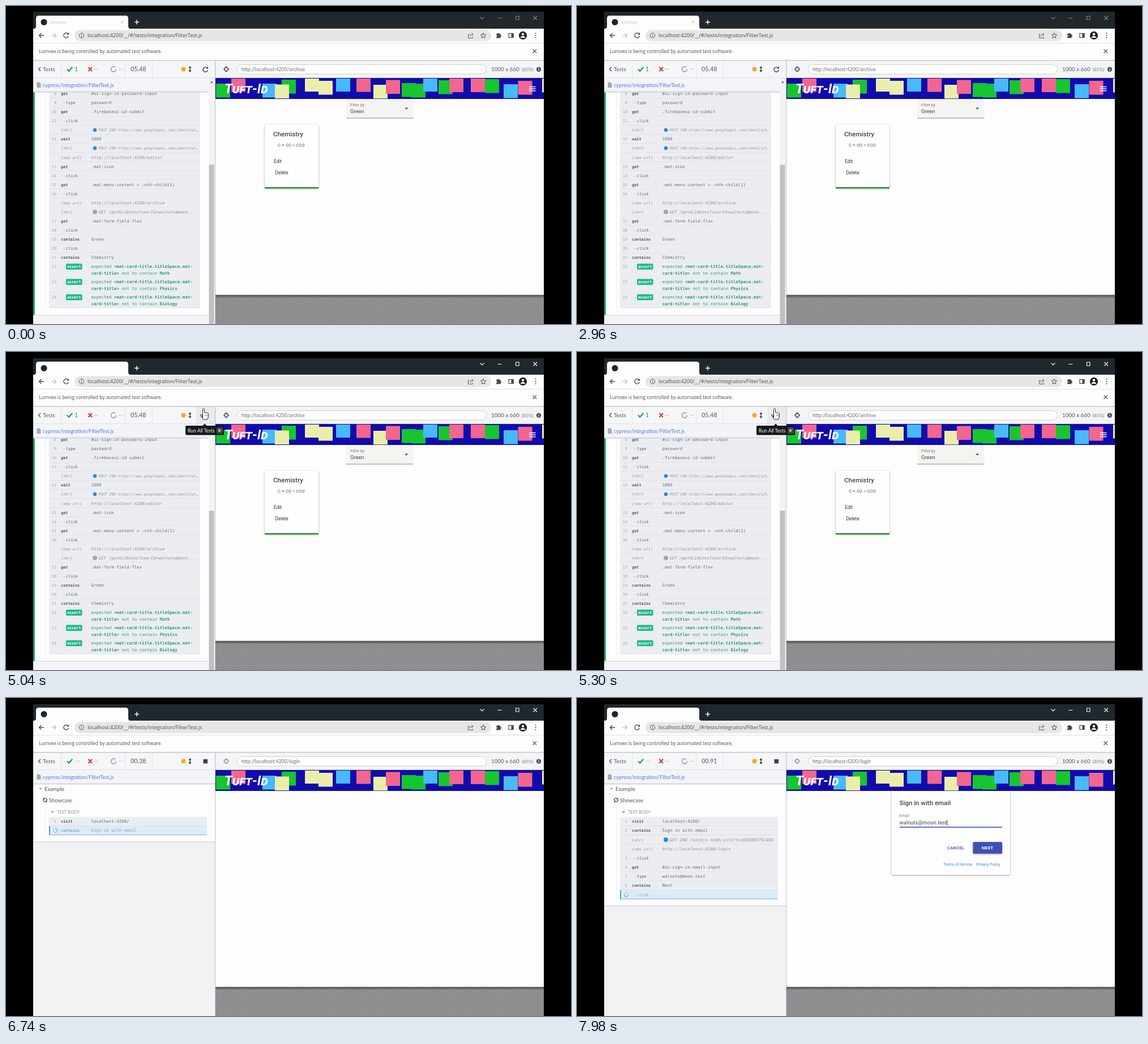
An HTML page that plays this animation: 998 px wide and 561 px high, repeating every 8000 ms.

```html
<!DOCTYPE html>
<html lang="en">
<head>
<meta charset="utf-8">
<title>Test run</title>
<style>
  html, body { margin: 0; width: 100%; height: 100%; overflow: hidden; background: #000; }
  svg { display: block; width: 100%; height: 100%; }
  text { white-space: pre; }
  .ui { font-family: "Open Sans", sans-serif; }
  .lato { font-family: Lato, sans-serif; }
  .mono { font-family: "DejaVu Sans Mono", monospace; }
  .rob { font-family: Roboto, sans-serif; }
  .b { font-weight: 700; }
  .m { font-weight: 500; }
  .i { font-style: italic; }
  .shadow { filter: drop-shadow(0 1px 1.5px rgba(0,0,0,.38)); }
</style>
</head>
<body>
<svg id="stage" viewBox="0 0 998 561" preserveAspectRatio="none"></svg>
<script>
const LOOP = 8000;
const EMAIL = 'walnuts@moon.test';
const esc = s => s.replace(/&/g, '&amp;').replace(/</g, '&lt;');
const text = (x, y, s, size, fill, cls = 'lato', extra = '') =>
  `<text x="${x}" y="${y}" font-size="${size}" fill="${fill}" class="${cls}" ${extra}>${esc(s)}</text>`;
const rect = (x, y, w, h, fill, extra = '') =>
  `<rect x="${x}" y="${y}" width="${w}" height="${h}" fill="${fill}" ${extra}/>`;
const line = (d, color, w = 1, extra = '') =>
  `<path d="${d}" fill="none" stroke="${color}" stroke-width="${w}" ${extra}/>`;
const shape = (d, fill, extra = '') => `<path d="${d}" fill="${fill}" ${extra}/>`;
const dot = (x, y, r, fill, extra = '') => `<circle cx="${x}" cy="${y}" r="${r}" fill="${fill}" ${extra}/>`;
const group = (id, body, extra = '') => `<g id="${id}" ${extra}>${body}</g>`;

// ---- browser window ----
const controls = color =>
  line('M837.5 19.5l3.5 3.5 3.5-3.5M868.5 21.5h7M900.5 18h5.5v6h-5.5zM931.5 18l6.5 6.5M938 18l-6.5 6.5', color, 1.1);

function browser() {
  return rect(48, 11, 902, 550, '#fdfdfd') + rect(48, 11, 902, 29, '#21282d') +
    shape('M49 40Q53 40 53 36V22Q53 17 58 17H211Q216 17 216 22V36Q216 40 220 40Z', '#fdfdfd') +
    dot(67, 28.5, 5.5, '#20242a') +
    line('M227 28.5h8M231 24.5v8', '#fff', 1.4) +
    rect(121, 42.5, 736, 19.5, '#e6e7e5', 'rx="9.75"') +
    line('M67 52h-8.5M62.5 48l-4 4 4 4', '#45494d', 1.3) +
    line('M80 52h8.5M84.5 48l4 4-4 4', '#b9bbbd', 1.2) +
    line('M109.8 49.5A4.3 4.3 0 1 0 110.3 53', '#45494d', 1.3) + shape('M107 50.5h4v-4z', '#45494d') +
    dot(133.5, 52, 4.2, 'none', 'stroke="#55595d"') + line('M133.5 51.5v3M133.5 49.5v1', '#55595d', 1.1) +
    text(144, 55.3, 'localhost:4200/__/#/tests/integration/FilterTest.js', 8.95, '#44484c', 'ui') +
    line('M819 50h-2.5v6.5h8v-2M819.5 54q0-4 5-4M822.5 47.5l2.5 2.5-2.5 2.5', '#55595d', 1) +
    line('M843 47.5l1.4 3 3.2.4-2.4 2.2.6 3.2-2.8-1.6-2.8 1.6.6-3.2-2.4-2.2 3.2-.4z', '#45494d', 1) +
    shape('M866 49h2.2a1.5 1.5 0 0 1 3 0h2.3v2.3a1.5 1.5 0 0 1 0 3v2.3h-7.5v-2.3a1.5 1.5 0 0 0 0-3z', '#45494d') +
    rect(888, 48.5, 8, 7, 'none', 'stroke="#45494d" stroke-width="1.2"') + rect(892.5, 48, 4, 8, '#45494d') +
    dot(913, 52, 7.2, '#1f2327') + dot(913, 49.8, 2.2, '#fff') + shape('M908.5 56q1-3 4.5-3t4.5 3z', '#fff') +
    [48, 52, 56].map(y => dot(935.5, y, 1, '#45494d')).join('') +
    rect(48, 65, 902, 1, '#dedfe0') +
    text(58, 83, 'Lumvex is being controlled by automated test software.', 8.45, '#4a4e52', 'ui') +
    line('M930.5 76.5l6.5 6.5M937 76.5l-6.5 6.5', '#55595d', 1.2) +
    rect(48, 95, 902, 2.5, '#d2d3d5');
}

// ---- runner header ----
function header() {
  const seps = [97, 210, 258].map(x => rect(x, 97, 1, 30, '#e3e4ea')).join('');
  return rect(48, 97, 321, 30, '#f5f6f7') + seps +
    line('M61 108l-3.5 3.5 3.5 3.5', '#4a4e56', 1.4) + text(65, 115, 'Tests', 9.8, '#55595f') +
    line('M108 111.5l3.2 3.3 6-7', '#21a06e', 2.3) +
    line('M145.5 108l6.5 7M152 108l-6.5 7', '#dd3a3d', 2.2) + text(155, 115, '--', 10.5, '#e08a8a') +
    dot(190, 111.5, 4.5, 'none', 'stroke="#8f92a5" stroke-width="1.4" stroke-dasharray="24 4.3"') +
    text(199, 115, '--', 10.5, '#a9abbd') +
    dot(313.5, 111.5, 4, '#f9a825') +
    line('M325 108v7', '#333a42', 1.3) + shape('M322.3 109.5l2.7-3.5 2.7 3.5zM322.3 113.5l2.7 3.5 2.7-3.5z', '#333a42') +
    rect(370, 97, 580, 30, '#f3f4f5') +
    rect(408.5, 103.5, 440, 16.5, '#fefefe', 'rx="8" stroke="#cfd0d2"') +
    text(857, 115, '1000 x 660', 9.8, '#55595f') + text(911, 115, '(85%)', 8.2, '#777b80') +
    dot(941, 111.8, 4.2, '#4a4e55') + rect(940.5, 110.8, 1.2, 3.5, '#fff') + rect(940.5, 108.8, 1.2, 1.2, '#fff');
}
const aim = color => dot(389, 111.5, 3.5, 'none', `stroke="${color}" stroke-width="1.3"`) +
  line('M389 106.5v3.5M389 113v3.5M384 111.5h3.5M390.5 111.5h3.5', color, 1.2);

// ---- command log ----
const SIZE = 7.45, ROW = '#ebedf1', RULE = '#d9dce3';
function row(y, [num, name, msg, size = SIZE, color = '#2f86d1'], right, running) {
  const event = !num, child = name[0] === '-';
  const ink = running ? '#86a4b8' : event ? '#8f939a' : '#545a61';
  const cls = event ? 'mono i' : 'mono';
  let out = rect(76, y - 8, right - 76, 16.1, running ? '#dcebf8' : ROW) +
    rect(76, y + 7.4, right - 76, .8, running ? '#5fa5dd' : RULE);
  if (running) out += rect(76, y - 8, 1.6, 16, '#3f87c4') + spinner(87, y);
  else out += text(89, y + 2.6, num, 6.9, '#a3a7af', 'mono', 'text-anchor="end"');
  out += child ? text(100.5, y + 2.6, '-', 6.9, ink, 'mono') + text(106, y + 2.6, name.slice(1), 6.9, ink, 'mono m')
    : text(97, y + 2.6, name, 6.9, ink, event ? cls : 'mono b');
  const xhr = name === '(xhr)';
  if (xhr) out += dot(157, y, size < 7 ? 3.3 : 4, color);
  return out + text(xhr ? 163.5 : 150.5, y + 2.6, msg, size, running || event ? ink : '#696e75', cls);
}
const spinner = (x, y) => dot(x, y, 3.5, 'none',
  `class="spin" data-c="${x} ${y}" stroke="#7ba6c8" stroke-width="1.3" stroke-dasharray="12 2 1.5 2 1.5 3"`);

const post = ['', '(xhr)', 'POST 200 https://www.googleapis.com/identityt…', 6.35];
const DONE = [
  ['8', 'get', '#ui-sign-in-password-input'], ['9', '-type', 'password'],
  ['10', 'get', '.firebaseui-id-submit'], ['11', '-click', ''], post,
  ['12', 'wait', '1000'], post, ['', '(new url)', 'http://localhost:4200/editor'],
  ['13', 'get', '.mat-icon'], ['14', '-click', ''],
  ['15', 'get', '.mat-menu-content > :nth-child(1)'], ['16', '-click', ''],
  ['', '(new url)', 'http://localhost:4200/archive'],
  ['', '(xhr)', 'GET /getALLNotes?userId=walnuts@moon...', 7.3, '#a3a5a8'],
  ['17', 'get', '.mat-form-field-flex'], ['18', '-click', ''],
  ['19', 'contains', 'Green'], ['20', '-click', ''], ['21', 'contains', 'Chemistry']
];
function assertion(subject, k) {
  const y = 459.5 + 27 * k, green = '#2f9a74';
  return rect(76, y - 8, 267, 27, ROW) + rect(76, y + 18.3, 267, .8, RULE) +
    text(89, y + 2.6, String(22 + k), 6.9, '#a3a7af', 'mono', 'text-anchor="end"') +
    text(100.5, y + 2.6, '-', 6.9, '#545a61', 'mono') +
    rect(106, y - 5, 28.5, 10.5, '#1fb986', 'rx="1.5"') + text(108, y + 2.3, 'assert', 6.7, '#fff', 'mono b') +
    `<text class="mono" font-size="${SIZE}" fill="${green}"><tspan x="150.5" y="${y + 2.6}">expected </tspan>` +
    `<tspan class="b">&lt;mat-card-title.titleSpace.mat-</tspan><tspan class="b" x="150.5" y="${y + 14.6}">card-title&gt;</tspan>` +
    `<tspan> not to contain </tspan><tspan class="b">${subject}</tspan></text>`;
}
const fileBar = () => rect(48, 127, 321, 24.5, '#f3f4f8') + rect(48, 150.5, 321, 2, '#d3d5e0') +
  shape('M54.5 134.5h4.5l2.5 2.5v7h-7z', '#a5a8ae') +
  text(65, 142.5, 'cypress/integration/FilterTest.js', 9.04, '#5577dc');

function doneLog() {
  return rect(48, 127, 310, 418, '#fdfdfd') + rect(48, 545, 310, 1.2, '#cfd0e2') + rect(48, 546, 310, 15, '#f4f4f6') +
    rect(48, 152, 3, 393, '#1fa971') + line('M69.5 152v381', '#dcdfe3', 1, 'stroke-dasharray="1 1"') +
    DONE.map((r, i) => row(154.5 + 16.06 * i, r, 343)).join('') +
    ['Math', 'Physics', 'Biology'].map(assertion).join('') + fileBar() +
    rect(358, 127, 11, 434, '#f3f3f3') + rect(358.5, 280, 9, 281, '#c1c1c3') +
    shape('M361 135.5l2.3-3 2.3 3z', '#444');
}

// [start time, row]
const RUN = [
  [6180, ['1', 'visit', 'localhost:4200/']],
  [6680, ['2', 'contains', 'Sign in with email']],
  [6800, ['', '(xhr)', 'GET 200 /sockjs-node/info?t=1650405791403']],
  [6860, ['', '(new url)', 'http://localhost:4200/login']],
  [6900, ['3', '-click', '']],
  [7000, ['4', 'get', '#ui-sign-in-email-input']],
  [7060, ['5', '-type', EMAIL]],
  [7700, ['6', 'contains', 'Next']],
  [7800, ['7', '-click', '']]
];
function runLog(count) {
  const bottom = 221 + 16.15 * count;
  const rows = RUN.slice(0, count).map(([, r], i) =>
    row(217.7 + 16.15 * i, r, 355, i === count - 1 && r[0] !== '')).join('');
  return rect(48, 152, 321, bottom - 152, '#fdfdfd') + rect(48, bottom, 321, 1.2, '#cfd0e2') +
    shape('M58.5 158.8h5l-2.5 3z', '#8a8e94') + text(68, 163.5, 'Example', 9.4, '#50545a') +
    `<g class="spin" data-c="69 180">${line('M65.7 180.5a3.3 3.3 0 0 1 5.8-2.6M72.3 179.5a3.3 3.3 0 0 1-5.8 2.6', '#4c5158', 1.3)}` +
    `${shape('M72.7 176v3.3h-3.3zM65.3 184v-3.3h3.3z', '#4c5158')}</g>` +
    text(76, 183.5, 'Showcase', 9.4, '#50545a') +
    line(`M69.5 193V${bottom - 11}`, '#dcdfe3', 1, 'stroke-dasharray="1 1"') +
    (count ? shape('M79.5 199.7h5.5l-2.75 3.2z', '#8a8e94') + text(90, 204, 'TEST BODY', 7.5, '#888c93') : '') + rows;
}

// ---- page under test ----
const PINK = '#f26690', GREEN = '#17c52f', BLUE = '#48b9fa', CREAM = '#ebeeab';
const NOTES = [
  [398, 127, PINK], [371, 137, GREEN], [453, 137, BLUE], [487, 130, GREEN], [475, 138.5, CREAM],
  [528, 126.5, CREAM], [552, 132, CREAM], [583, 126.5, BLUE], [619, 127, PINK], [649, 139, CREAM],
  [671, 130.5, PINK], [699, 136, GREEN], [716, 137, GREEN], [737, 126.5, BLUE], [764, 131, GREEN],
  [783, 127.5, PINK], [821, 127.5, PINK], [846, 129, GREEN], [879, 138, BLUE], [904.5, 132, PINK], [947, 128, CREAM]
];
const banner = () => rect(370, 127, 580, 37, '#120bac') +
  `<g clip-path="url(#bar)">${NOTES.map(([x, y, c]) => rect(x, y, 25, 24.5, c)).join('')}</g>` +
  text(386, 154, 'Tuft-Id', 23, '#fff', 'rob b i', 'style="font-variant:small-caps"');

const archive = () =>
  [141.8, 145.3, 148.8].map(y => rect(924, y, 11.5, 1.5, '#fff')).join('') +
  rect(601, 164, 118.5, 34, '#f4f4f1') + rect(601, 197.3, 118.5, 1, '#8b8b8b') +
  text(608, 177, 'Filter by', 7.1, '#777', 'rob') + text(608, 188.5, 'Green', 9.4, '#444', 'rob') +
  shape('M704 179.5h6.5l-3.25 3.3z', '#555') +
  rect(457, 209.5, 95, 112, '#fefefe', 'rx="2" class="shadow"') + rect(457, 319.5, 95, 2.3, '#25892b') +
  text(472, 230, 'Chemistry', 11.6, '#444', 'rob m') + text(480, 247.5, 'C + O2 = CO2', 8.1, '#555', 'rob') +
  text(473, 276.5, 'Edit', 8.3, '#333', 'rob') + text(475.5, 297, 'Delete', 8.2, '#333', 'rob');

const login = () =>
  rect(555.5, 164, 209.5, 148, '#fefefe', 'class="shadow"') +
  banner() +
  text(569.5, 188.5, 'Sign in with email', 11.5, '#444', 'rob m') +
  text(569.8, 210, 'Email', 6.9, '#777', 'rob') + rect(570, 227.5, 181, .6, '#bbb') +
  rect(570, 227, 181, 1.6, '#3f51b5', 'id="focus"') +
  '<text id="typed" x="569.5" y="223.3" font-size="9.4" fill="#444" class="rob"></text>' +
  rect(0, 215, .9, 10, '#222', 'id="caret"') +
  text(654, 266.5, 'CANCEL', 8, '#3f51b5', 'rob m') +
  rect(699.5, 254, 51.5, 20.5, '#3f51b5', 'rx="1.5" class="shadow"') + text(715, 266.7, 'NEXT', 8, '#fff', 'rob b') +
  text(647, 296, 'Terms of Service', 6.9, '#4a7fd6', 'rob') + text(705, 296, 'Privacy Policy', 6.9, '#4a7fd6', 'rob');

const hand = shape('M-1.5 8V-6.5q0-1.5 1.5-1.5t1.5 1.5v5l5 1q2 .5 2 2.5v3q0 3-2 6h-7q-2-3-5-7 0-2 2-1.5z',
  '#fff', 'stroke="#222" transform="translate(-1 0)"') + line('M3 2v3M5.5 2.5v3', '#222', .7);
const arrow = shape('M0-8v14l3.3-3 2.2 5 2-1-2.2-4.8h4.5z', '#fff', 'stroke="#222" stroke-width=".9"');

document.getElementById('stage').innerHTML =
  `<defs><clipPath id="bar">${rect(370, 128, 580, 35.5)}</clipPath>` +
  `<pattern id="hatch" width="4" height="4" patternUnits="userSpaceOnUse">${rect(0, 0, 4, 4, '#a2a2a3')}` +
  `${line('M-1 1l2-2M-1 5l6-6M3 5l2-2', '#79797c', 1.3)}</pattern>` +
  '<linearGradient id="fall" x2="0" y2="1"><stop stop-opacity=".5"/><stop offset="1" stop-opacity="0"/></linearGradient></defs>' +
  rect(0, 0, 998, 561, '#000') + browser() +
  group('idle', rect(48, 10, 902, 1.5, '#21282d') + controls('#85898c') + text(78, 31.3, 'webapp', 7.5, '#c4c5bb', 'ui') +
    line('M203 26l4.5 4.5M207.5 26l-4.5 4.5', '#b4b5b0', 1)) +
  group('focused', controls('#fff')) + header() +
  group('passed', text(121, 115, '1', 10.5, '#2c9a70') + aim('#3f444a')) +
  group('running', text(122, 115, '--', 10.5, '#8cb9a5') + aim('#93979c') + rect(348.5, 108, 7.5, 7.5, '#3d4249')) +
  group('hover', rect(336, 97, 33, 30, '#e9eaee')) +
  group('reload', line('M355.5 109.5A4.2 4.2 0 1 0 356.3 113', '#3d4249', 1.4) + shape('M353 110.5h4v-4z', '#3d4249')) +
  '<text id="clock" class="lato" x="220" y="115.3" font-size="10.8" fill="#55595f"></text>' +
  '<text id="address" class="lato" x="416" y="114.6" font-size="8.76" fill="#696d72"></text>' +
  group('loading', shape('M797 103.5h48q8 0 8 8.25t-8 8.25h-48z', '#e9eaec', 'stroke="#cfd0d2"') +
    text(800.5, 115, '...loading', 8.4, '#666a70') +
    dot(842, 111.5, 4, 'none', 'class="spin" data-c="842 111.5" stroke="#6d7177" stroke-width="2" stroke-dasharray="1.6 1.54"')) +
  rect(48, 126.5, 902, 1, '#d0d2dc') + rect(48, 127, 321, 434, '#f2f2f4') +
  group('doneLog', doneLog()) + group('runLog', '') + group('runBar', fileBar()) +
  rect(369, 97, 1.3, 464, '#c3c4d8') +
  rect(370.3, 127, 579.7, 383, '#fdfdfd') + group('banner', banner()) + group('archive', archive()) + group('login', login()) +
  rect(370, 510, 580, 51, 'url(#hatch)') + rect(370, 509.5, 580, 6, 'url(#fall)') +
  group('tip', rect(317, 130, 68, 16.5, '#17181a', 'rx="2"') + shape('M347 130.5l4-4 4 4z', '#17181a') +
    text(321, 141.5, 'Run All Tests', 8.6, '#fff') + rect(372, 133, 11, 11, '#43464b', 'rx="1.5"') +
    text(375.3, 141, 'R', 6.5, '#fff', 'mono b')) +
  group('cursor', group('arrow', arrow) + group('hand', hand));

// ---- timeline ----
const FOCUS = 3700, HOVER = 4780, RERUN = 5400, GONE = 5700, LOADED = 6660, FORM = 6940;
const CLOCK = [[6100, 0], [6440, .20], [7260, .70], [7980, .91], [8000, .92]];
const POINTER = [[4300, 410, 210], [HOVER, 350, 108], [RERUN, 350, 108], [GONE, 620, -14]];

const $ = id => document.getElementById(id);
const clamp = v => Math.min(1, Math.max(0, v));
const show = (id, on) => { $(id).style.display = on ? '' : 'none'; };
function sample(keys, t, col = 1) {
  if (t <= keys[0][0]) return keys[0][col];
  for (let i = 1; i < keys.length; i++) {
    const a = keys[i - 1], b = keys[i];
    if (t <= b[0]) return a[col] + (b[col] - a[col]) * (t - a[0]) / (b[0] - a[0]);
  }
  return keys[keys.length - 1][col];
}

let shownRows = -1;
function render(t) {
  const rerun = t >= RERUN, loaded = t >= LOADED, form = t >= FORM;
  const hovering = t >= HOVER && !rerun;
  show('idle', t < FOCUS);
  show('focused', t >= FOCUS);
  show('passed', !rerun);
  show('running', rerun);
  show('hover', hovering);
  show('reload', !rerun && !hovering);
  show('doneLog', !rerun);
  show('runLog', t >= 6100);
  show('runBar', rerun);
  show('loading', t >= 6180 && !loaded);
  show('banner', !rerun || loaded);
  show('archive', !rerun);
  show('login', form);
  show('tip', hovering);
  show('cursor', t >= POINTER[0][0] && t < GONE);
  show('hand', hovering);
  show('arrow', !hovering);
  $('cursor').setAttribute('transform', `translate(${sample(POINTER, t)} ${sample(POINTER, t, 2)})`);

  const secs = rerun ? sample(CLOCK, t) : 5.48;
  $('clock').textContent = rerun && t < 6100 ? '--' : secs.toFixed(2).padStart(5, '0');
  $('address').textContent = rerun && t < 6180 ? '' :
    'http://localhost:4200/' + (!rerun ? 'archive' : loaded ? 'login' : '');

  const count = RUN.filter(([at]) => t >= at).length;
  if (count !== shownRows) {
    $('runLog').innerHTML = runLog(count);
    shownRows = count;
  }
  document.querySelectorAll('.spin').forEach(el =>
    el.setAttribute('transform', `rotate(${t * .36 % 360} ${el.dataset.c})`));

  const chars = Math.floor(clamp((t - 7105) / 510) * EMAIL.length);
  $('typed').textContent = EMAIL.slice(0, chars);
  if (form) $('caret').setAttribute('x', 569.8 + (chars ? $('typed').getComputedTextLength() : 0));
  const grow = 1 - (1 - clamp((t - 7040) / 320)) ** 3;
  $('focus').setAttribute('transform', `translate(${660.5 * (1 - grow)} 0) scale(${grow} 1)`);
}

const start = performance.now();
function tick() {
  render((performance.now() - start) % LOOP);
  requestAnimationFrame(tick);
}
tick();
</script>
</body>
</html>
```
